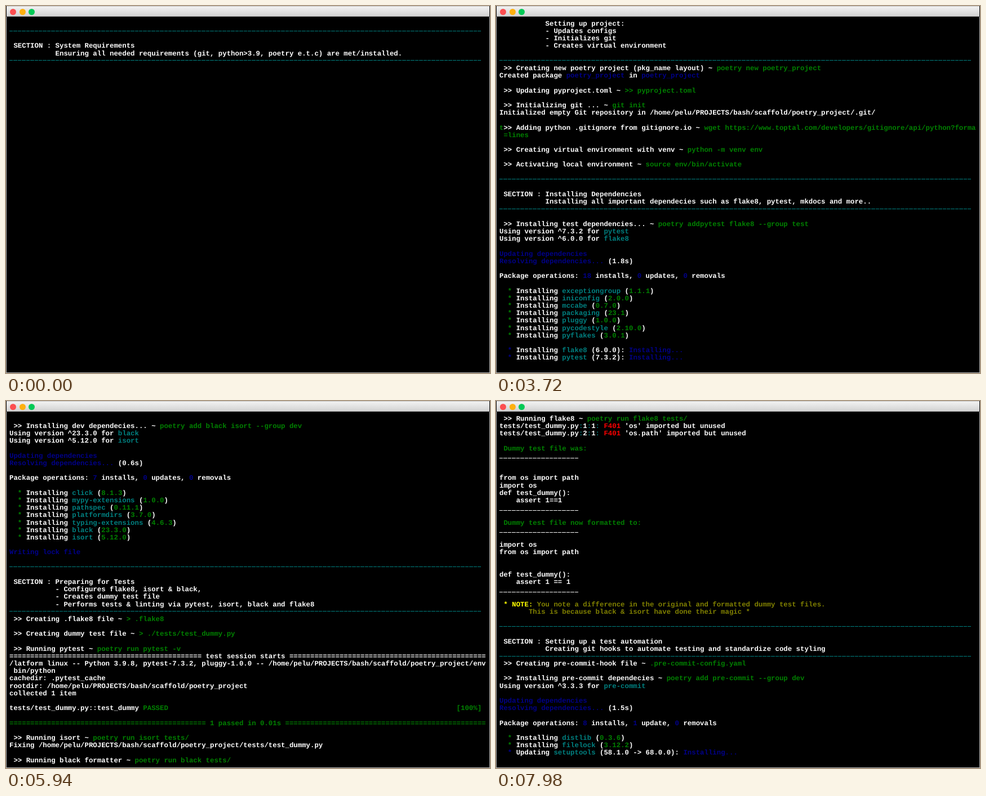
Recreate the animation shown at these times as an HTML page. Size 859 px wide and 652 px high, loop 8 s.

```html
<!DOCTYPE html>
<html lang="en">
<head>
<meta charset="utf-8">
<title>Project scaffold terminal</title>
<style>
html, body { margin: 0; width: 100%; height: 100%; overflow: hidden; background: #000 }
#bar { position: absolute; left: 1px; top: 0; width: 857px; height: 19px; box-sizing: border-box;
  background: linear-gradient(#f2f2f2, #d2d2d2); border: solid #c4c4c4; border-width: 1px 0;
  border-bottom-color: #9a9a9a }
#bar i { position: absolute; top: 4px; width: 11px; height: 11px; border-radius: 50% }
#edge { position: absolute; left: 0; top: 19px; width: 859px; height: 633px; box-sizing: border-box;
  border: solid #bbb; border-width: 0 1px 1px 1px }
pre { position: absolute; left: 6px; top: 25.9px; margin: 0; color: #fff;
  font: bold 12.365px/13.185px "Liberation Mono", monospace;
  text-rendering: geometricPrecision; font-variant-ligatures: none }
g { color: #008000 }
c { color: #008080 }
n { color: #000088 }
r { color: #f00 }
y { color: #ff0 }
o { color: #808000 }
w { color: #e0e0e0 }
u { display: inline-block; height: 1px; vertical-align: 3.4px; text-decoration: none;
  background: repeating-linear-gradient(90deg, currentColor 0 6.4px, #0000 6.4px 7.42px) }
u.low { vertical-align: -1.5px }
</style>
</head>
<body>
<div id="edge"></div>
<div id="bar">
  <i style="left:5.5px;background:#fc4e50"></i>
  <i style="left:22.5px;background:#fdb010"></i>
  <i style="left:38.5px;background:#00ca56"></i>
</div>
<pre id="term"></pre>
<script>
const LOOP = 8000, ROWS = 47, CELL = 7.42;
const author = 'Gregory Tavendo', home = '/home/pelu/PROJECTS/bash/scaffold/poetry_project';

const rule = `<c><u style="width:${113 * CELL}px"></u></c>`;
const under = `<u class="low" style="width:${19 * CELL}px"></u>`;
const pad = ' '.repeat(11);
const section = (title, ...notes) =>
  [rule, '', ` SECTION : ${title}`, ...notes.map(s => pad + s)];
const cmd = (text, code) => ` >> ${text} ~ <g>${code}</g>`;
const using = (version, name) => `Using version ^${version} for <c>${name}</c>`;
const lock = '<n>Writing lock file</n>';
const resolve = (start, total) => ['', '<n>Updating dependencies</n>', t => {
  const s = Math.min(total, Math.max(0, Math.floor((t - start) / 60)) * .2);
  return `<n>Resolving dependencies...</n> (${s.toFixed(1)}s)`;
}, ''];
const operations = (a, b, c) =>
  `Package operations: <n>${a}</n> installs, <n>${b}</n> update${b == 1 ? '' : 's'}, <n>${c}</n> removals`;
// each package shows a pending state until its own finishing time
const install = (start, gap, list) => list.split(' ').map((item, i) => {
  const [name, version] = item.split('=');
  return t => t < start + i * gap
    ? `  <n>*</n> Installing <c>${name}</c> (${version}): <n>Installing...</n>`
    : `  <g>*</g> Installing <c>${name}</c> (<g>${version}</g>)`;
});
const lint = (line, name) =>
  `tests/test_dummy.py<c>:</c>${line}<c>:</c>1<c>:</c> <r>F401</r> '${name}' imported but unused`;

const log = [
  '',
  ...section('System Requirements',
    'Ensuring all needed requirements (git, python>3.9, poetry e.t.c) are met/installed.'),
  rule,
  ' All requirements have been satisfied *',
  ...['grep (GNU grep) 3.4', 'GNU Awk 5.0.1, API: 2.0 (GNU MPFR 4.0.2, GNU MP 6.2.0)',
    'head (GNU coreutils) 8.30', 'GNU Wget 1.20.3 built on linux-gnu.', 'curl 7.68.0',
    'git version 2.25.1', 'Python 3.9.8', 'Poetry (version 1.5.1)'].map(s => `   <g>- ${s}</g>`),
  '',
  ...section('Defining Project', 'Set your project details'),
  rule,
  ` Enter Your Name [${author}]:`,
  ' Project Name [poetry_project]:',
  ' Project Version [0.1.0]:',
  ' Awesome! Project details below will be used:',
  ` <g>Author: <w>${author}</w>, Project: <w>poetry_project</w>, Version: <w>0.1.0</w></g>`,
  '',
  ' Is that okay? (y/n) [y]',
  '',
  ...section('Project Initialization', 'Setting up project:', '- Updates configs',
    '- Initializes git', '- Creates virtual environment'),
  '',
  rule,
  cmd('Creating new poetry project (pkg_name layout)', 'poetry new poetry_project'),
  'Created package <n>poetry_project</n> in <n>poetry_project</n>',
  '',
  cmd('Updating pyproject.toml', '>> pyproject.toml'),
  '',
  cmd('Initializing git ...', 'git init'),
  `Initialized empty Git repository in ${home}/.git/`,
  '',
  '<g>t</g>' + cmd('Adding python .gitignore from gitignore.io',
    'wget https://www.toptal.com/developers/gitignore/api/python?forma').slice(1),
  ' <g>=lines</g>',
  '',
  cmd('Creating virtual environment with venv', 'python -m venv env'),
  '',
  cmd('Activating local environment', 'source env/bin/activate'),
  '',
  ...section('Installing Dependencies',
    'Installing all important dependecies such as flake8, pytest, mkdocs and more..'),
  rule,
  '',
  cmd('Installing test dependencies...', 'poetry addpytest flake8 --group test'),
  using('7.3.2', 'pytest'),
  using('6.0.0', 'flake8'),
  ...resolve(2940, 1.8),
  operations(18, 0, 0),
  '',
  ...install(3600, 20, 'exceptiongroup=1.1.1 iniconfig=2.0.0 mccabe=0.7.0 packaging=23.1 ' +
    'pluggy=1.0.0 pycodestyle=2.10.0 pyflakes=3.0.1'),
  '',
  ...install(3780, 0, 'flake8=6.0.0 pytest=7.3.2'),
  '',
  lock,
  '',
  cmd('Installing dev dependecies...', 'poetry add black isort --group dev'),
  using('23.3.0', 'black'),
  using('5.12.0', 'isort'),
  ...resolve(4320, .6),
  operations(7, 0, 0),
  '',
  ...install(4570, 15, 'click=8.1.3 mypy-extensions=1.0.0 pathspec=0.11.1 platformdirs=3.7.0 ' +
    'typing-extensions=4.6.3 black=23.3.0 isort=5.12.0'),
  '',
  lock,
  '',
  ...section('Preparing for Tests', '- Configures flake8, isort & black,',
    '- Creates dummy test file', '- Performs tests & linting via pytest, isort, black and flake8'),
  rule,
  cmd('Creating .flake8 file', '> .flake8'),
  '',
  cmd('Creating dummy test file', '> ./tests/test_dummy.py'),
  '',
  cmd('Running pytest', 'poetry run pytest -v'),
  '='.repeat(46) + ' test session starts ' + '='.repeat(47),
  `/latform linux -- Python 3.9.8, pytest-7.3.2, pluggy-1.0.0 -- ${home}/env`,
  ' bin/python',
  'cachedir: .pytest_cache',
  `rootdir: ${home}`,
  'collected 1 item',
  '',
  `tests/test_dummy.py::test_dummy <g>PASSED${' '.repeat(69)}[100%]</g>`,
  '',
  `<g>${'='.repeat(47)} 1 passed in 0.01s ${'='.repeat(48)}</g>`,
  '',
  cmd('Running isort', 'poetry run isort tests/'),
  `Fixing ${home}/tests/test_dummy.py`,
  '',
  cmd('Running black formatter', 'poetry run black tests/'),
  `reformatted ${home}/tests/test_dummy.py`,
  '',
  'All done! * * *',
  '<n>1 file</n> reformatted, <n>1 file</n> left unchanged.',
  '',
  cmd('Running flake8', 'poetry run flake8 tests/'),
  lint(1, 'os'),
  lint(2, 'os.path'),
  '',
  ' <g>Dummy test file was:</g>',
  under,
  '',
  '',
  'from os import path',
  'import os',
  'def test_dummy():',
  '    assert 1==1',
  under,
  '',
  ' <g>Dummy test file now formatted to:</g>',
  under,
  '',
  'import os',
  'from os import path',
  '',
  '',
  'def test_dummy():',
  '    assert 1 == 1',
  under,
  '',
  ' <y>* NOTE:</y> <o>You note a difference in the original and formatted dummy test files.</o>',
  '       <o>This is because black & isort have done their magic *</o>',
  '',
  ...section('Setting up a test automation',
    'Creating git hooks to automate testing and standardize code styling'),
  rule,
  cmd('Creating pre-commit-hook file', '.pre-commit-config.yaml'),
  '',
  cmd('Installing pre-commit dependecies', 'poetry add pre-commit --group dev'),
  using('3.3.3', 'pre-commit'),
  ...resolve(7440, 1.5),
  operations(8, 1, 0),
  '',
  ...install(7950, 20, 'distlib=0.3.6 filelock=3.12.2'),
  '  <n>*</n> Updating <c>setuptools</c> (58.1.0 -> 68.0.0): <n>Installing...</n>',
  ''
];

// [time, lines printed so far]
const steps = [[0, 6], [240, 39], [480, 42], [660, 48], [1020, 50], [2340, 60], [2940, 65],
  [3600, 76], [3720, 79], [3780, 81], [3840, 82], [4320, 87], [4560, 98], [4680, 100],
  [4740, 108], [4980, 110], [5220, 112], [5580, 118], [5640, 124], [5940, 127], [6300, 133],
  [6600, 135], [6660, 166], [6900, 168], [7440, 172], [7920, 179]];

const term = document.getElementById('term');
let shown;
function draw() {
  const t = performance.now() % LOOP;
  const count = steps.findLast(s => s[0] <= t)[1];
  const html = log.slice(Math.max(0, count - ROWS), count)
    .map(line => typeof line == 'function' ? line(t) : line).join('\n');
  if (html !== shown) term.innerHTML = shown = html;
  requestAnimationFrame(draw);
}
draw();
</script>
</body>
</html>
```
